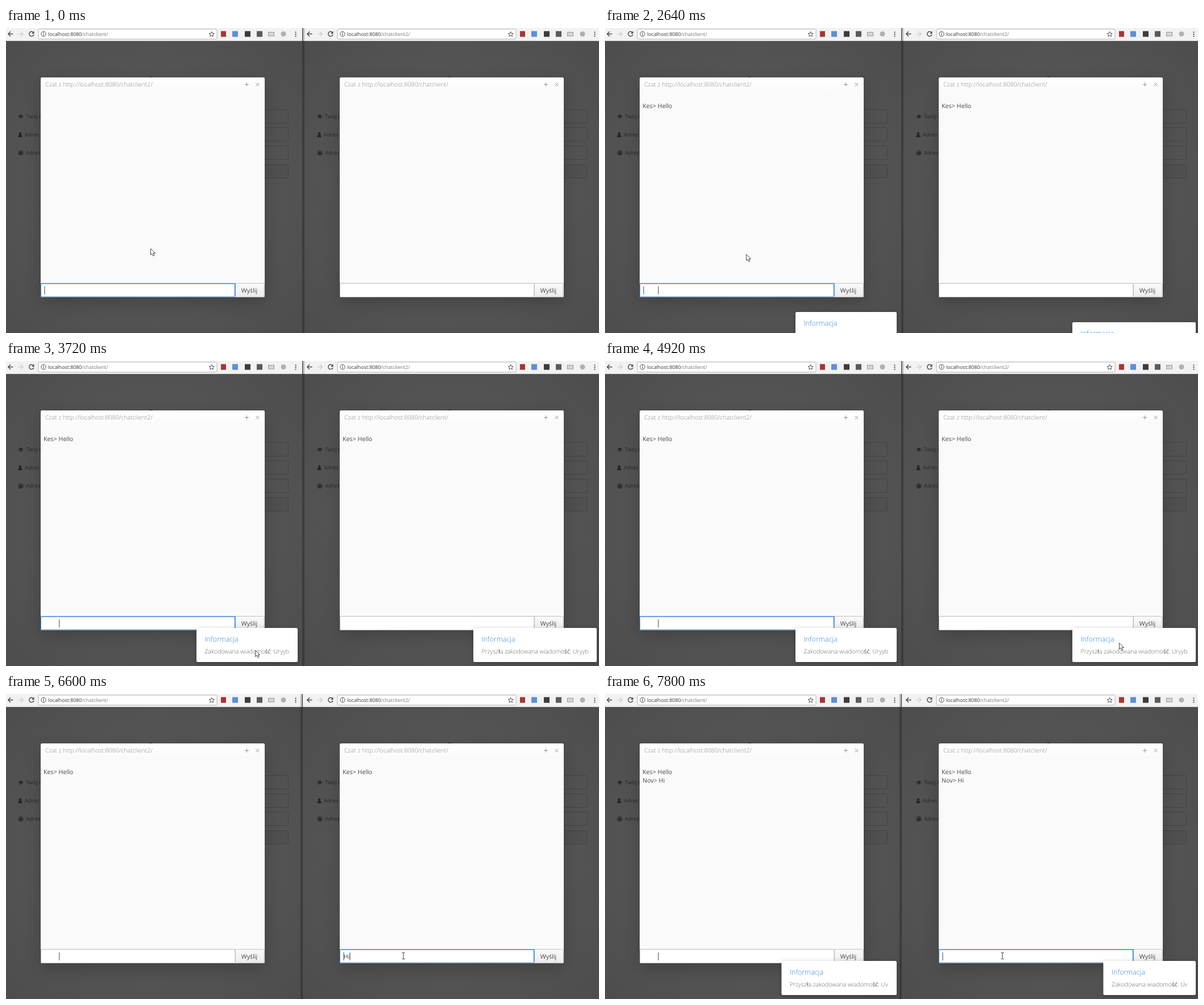
Animation, 1043 px wide and 537 px high, one loop 8000 ms. Source, as an HTML page:

```html
<!DOCTYPE html>
<html lang="pl">
<head>
<meta charset="utf-8">
<title>Czat</title>
<style>
html, body { margin: 0; width: 100%; height: 100%; overflow: hidden; background: #505050; }
#stage { display: block; width: 1043px; height: 537px; }
text { font-family: "Open Sans", "Noto Sans", sans-serif; font-size: 10.7px; fill: #474747; white-space: pre; text-rendering: geometricPrecision; }
.url { font-size: 8.8px; fill: #333; }
.url tspan { fill: #777; }
.label { font-size: 9.5px; fill: #292929; }
.title { font-size: 10.6px; font-weight: 300; fill: #8a8a8a; }
.caption { font-size: 12.4px; font-weight: 300; fill: #2f86d6; }
.body { font-size: 10.5px; font-weight: 300; fill: #666; }
.body tspan { font-weight: 400; fill: #505050; }
.line { fill: none; stroke: #4a4a4a; stroke-width: 1.4; }
.field { fill: none; stroke: #434343; }
.caret { fill: #444; }
</style>
</head>
<body>
<svg id="stage" viewBox="0 0 1043 537">
  <defs>
    <radialGradient id="curtain" gradientUnits="userSpaceOnUse" cx="258" cy="280" r="365">
      <stop stop-color="#5d5d5d"/><stop offset="1" stop-color="#4d4d4d"/>
    </radialGradient>
    <linearGradient id="button" x2="0" y2="1">
      <stop stop-color="#fafafa"/><stop offset="1" stop-color="#ededed"/>
    </linearGradient>
    <linearGradient id="head" x2="0" y2="1">
      <stop stop-color="#fff"/><stop offset="1" stop-color="#fafafa"/>
    </linearGradient>
    <linearGradient id="edge">
      <stop stop-color="#000" stop-opacity=".4"/><stop offset="1" stop-color="#000" stop-opacity="0"/>
    </linearGradient>
    <filter id="shadow" x="-20%" y="-20%" width="140%" height="150%">
      <feDropShadow dx="0" dy="9" stdDeviation="16" flood-opacity=".22"/>
    </filter>
    <filter id="soft" x="-10%" y="-25%" width="120%" height="160%">
      <feDropShadow dx="0" dy="2" stdDeviation="4" flood-opacity=".25"/>
    </filter>

    <g id="toolbar">
      <rect x="-4" width="530" height="23" fill="#f2f2f2"/>
      <rect x="-4" y="22" width="530" height="1" fill="#d2d2d2"/>
      <path class="line" d="M12.500 10.500H4M8 6.300 3.800 10.500 8 14.700"/>
      <path class="line" style="stroke:#d0d0d0" d="M21.500 10.500H30M26 6.300 30.200 10.500 26 14.700"/>
      <path class="line" d="M48 7.500A4.200 4.200 0 1 0 49 11.500"/>
      <path d="M49.500 5.500v4.500H45z" fill="#4a4a4a"/>
      <rect x="57" y="2" width="314" height="17.500" rx="1.500" fill="#fff" stroke="#b4b4b4"/>
      <circle class="line" style="stroke-width:1" cx="66" cy="10.500" r="4.100"/>
      <path class="line" style="stroke-width:1.200" d="M66 9.800v3M66 7.800v1.100"/>
      <path class="line" style="stroke-width:1" d="M361.700 6.300l1.300 3 3.200.3-2.400 2.100.7 3.200-2.800-1.700-2.800 1.700.7-3.200-2.400-2.100 3.200-.3z"/>
      <rect x="378" y="5.500" width="9" height="10" fill="#a83434"/>
      <rect x="398" y="5.500" width="10" height="10" fill="#5c8fd6"/>
      <rect x="420" y="5.500" width="10" height="10" fill="#3c3c3c"/>
      <rect x="441" y="5.500" width="10" height="10" fill="#5a5a5a"/>
      <rect x="461.500" y="7.500" width="10" height="6.500" fill="#e8e8e8" stroke="#909090"/>
      <path d="M463 9.500h7M463 11.800h7" stroke="#909090" stroke-dasharray="1 1"/>
      <circle cx="488" cy="10.500" r="4.500" fill="#b0b0b0"/>
      <path d="M509.500 6.500v9" stroke="#4a4a4a" stroke-width="1.900" stroke-dasharray="1.900 1.600"/>
    </g>

    <g id="form">
      <rect x="252" y="86" width="5" height="2" fill="#222"/>
      <path d="M21.500 156q4.500-6 9 0-4.500 5.500-9 0z" fill="none" stroke="#252525"/>
      <circle cx="26" cy="155.500" r="2.300" fill="#252525"/>
      <circle cx="25" cy="185.800" r="2.300" fill="#252525"/>
      <path d="M21.300 192.300q0-5 3.700-4.500 3.700-.5 3.700 4.500z" fill="#252525"/>
      <circle cx="26" cy="220" r="4" fill="none" stroke="#252525" stroke-width="1.200"/>
      <path d="M23.500 219.500h5v3h-5zM24.500 219.500v-2h3v2" fill="#252525"/>
      <text class="label" x="35" y="159">Twój nick</text>
      <text class="label" x="33" y="191">Adres czatu</text>
      <text class="label" x="35" y="223">Adres czatu</text>
      <rect class="field" x="300.500" y="143.500" width="196" height="24" rx="2"/>
      <rect class="field" x="300.500" y="175.500" width="196" height="24" rx="2"/>
      <rect class="field" x="300.500" y="207.500" width="196" height="24" rx="2"/>
      <rect class="field" x="300.500" y="240.500" width="196" height="23.500" rx="2" style="fill:#505050"/>
    </g>

    <g id="window">
      <rect x="61" y="87" width="394" height="387" rx="2.500" fill="#fff" filter="url(#shadow)"/>
      <rect x="62" y="88" width="392" height="24" fill="url(#head)"/>
      <rect x="62" y="111" width="392" height="338" fill="#fafafa"/>
      <path d="M420 99.500h7M423.500 96v7M439.500 96.500l6 6M445.500 96.500l-6 6" stroke="#8c8c8c" stroke-width=".9"/>
      <rect x="403.500" y="449.500" width="50.500" height="23.500" rx="1.500" fill="url(#button)" stroke="#c2c2c2"/>
      <text x="428" y="466" text-anchor="middle">Wyślij</text>
      <path d="M61.500 473V449.500H403V473" fill="none" stroke="#b8b8b8"/>
      <path d="M62 473.300H403" stroke="#d4d4d4"/>
    </g>
    <g id="ring" fill="none" stroke="#5296dc">
      <rect x="61.500" y="449.500" width="341.500" height="23.500" rx="1.500"/>
      <path d="M62 449.800H402.700V473" stroke-width="1.800"/>
    </g>
  </defs>

  <svg id="left" width="522" height="537"></svg>
  <svg id="right" x="522" width="521" height="537"></svg>
  <rect id="edgeR" x="521.500" y="0" width="5" height="537" fill="url(#edge)"/>
  <rect id="edgeL" x="-521.500" y="0" width="5" height="537" fill="url(#edge)" transform="scale(-1 1)"/>
  <path d="M521.500 0V537" stroke="#3c3c3c"/>
  <path id="arrow" d="M.5.500V11.500L3.100 9.200 5 13.400 6.900 12.500 5.100 8.500H8.500z" fill="#fff" stroke="#333" stroke-width=".9"/>
  <path id="beam" d="M-2.500-5.500H-.7L0-5 .7-5.500H2.500M0-5V5M-2.500 5.500H-.7L0 5 .7 5.500H2.500" fill="none" stroke="#333"/>
</svg>
<script>
const LOOP = 8000;
const $ = id => document.getElementById(id);
const show = (el, on) => { el.style.display = on ? '' : 'none'; };

// Value of the last [time, ...values] row reached at t.
const at = (rows, t) => rows.reduce((cur, row) => t >= row[0] ? row : cur).slice(1);

const accent = s => s.replace(/ść|ł/g, '<tspan>$&</tspan>');

function toast(name, x, text) {
  return `<g id="${name}"><rect x="${x}" width="${513 - x}" height="60" rx="2.500" fill="#fff" filter="url(#soft)"/>
    <text class="caption" x="${x + 14.5}" y="24">Informacja</text>
    <text class="body" x="${x + 14.5}" y="45">${accent(text)}</text></g>`;
}

function pane(id, shift, path, peer, toasts) {
  $(id).innerHTML = `<g transform="translate(${shift})">
    <rect x="-4" width="530" height="537" fill="url(#curtain)"/>
    <use href="#form"/><use href="#toolbar"/>
    <text class="url" x="74" y="13.800">localhost:8080<tspan>/${path}/</tspan></text>
    <use href="#window"/>
    <text class="title" x="69" y="103">Czat z http://localhost:8080/${peer}/</text>
    <text id="${id}First" x="66" y="141">Kes&gt; Hello</text>
    <text id="${id}Second" x="66" y="155.700">Nov&gt; Hi</text>
    <use id="${id}Ring" href="#ring"/>
    <text id="${id}Input" x="67.700" y="466"></text>
    <rect id="${id}Start" class="caret" x="67.500" y="455" width="1" height="14"/>
    <rect id="${id}End" class="caret" y="455" width="1" height="14"/>
    ${toasts}</g>`;
}

pane('left', 0, 'chatclient', 'chatclient2',
  toast('sentHello', 335, 'Zakodowana wiadomość: Uryyb') +
  toast('gotHi', 310.5, 'Przyszła zakodowana wiadomość: Uv'));
pane('right', 4, 'chatclient2', 'chatclient',
  toast('gotHello', 296, 'Przyszła zakodowana wiadomość: Uryyb') +
  toast('sentHi', 350.5, 'Zakodowana wiadomość: Uv'));

const SENT = 2640, REPLIED = 7560, FOCUS = 6000, BEAM = 5640;

// Time, x, y
const pointer = [
  [0, 254, 388], [600, 251, 394], [720, 248, 398],
  [3360, 262, 412], [3480, 318, 450], [3600, 390, 488], [3720, 438, 509], [3840, 453, 514],
  [4560, 480, 515], [4680, 610, 511], [4800, 790, 503], [4920, 904, 496], [5040, 907, 498], [5160, 909, 498],
  [5400, 890, 492], [5520, 800, 472], [BEAM, 712, 461], [5760, 699, 461]
];
// Time, text, end caret x
const typedLeft = [[0, '', 0], [1080, 'H', 75], [1320, 'He', 82], [1440, 'Hell', 87], [1560, 'Hello', 93.3], [SENT, '', 93.3]];
const typedRight = [[0, '', 0], [6480, 'H', 75], [6600, 'Hi', 78.5], [REPLIED, '', 0]];
const blinkLeft = [[0, true], [3600, false], [5160, true], [5520, false]];

function slide(name, t, start, rise, end) {
  const el = $(name);
  show(el, t >= start && t < end);
  const y = at([[0, rise[0]], [start + 120, rise[1]], [start + 240, 470]], t)[0];
  el.setAttribute('transform', `translate(0 ${y})`);
  el.setAttribute('opacity', t >= 5040 && t < 5160 ? .5 : 1);
}

function input(id, rows, t, startOn) {
  const [text, x] = at(rows, t);
  $(id + 'Input').textContent = text;
  show($(id + 'Start'), startOn);
  show($(id + 'End'), x > 0);
  $(id + 'End').setAttribute('x', x);
}

function draw(t) {
  for (const id of ['left', 'right']) {
    show($(id + 'First'), t >= SENT);
    show($(id + 'Second'), t >= REPLIED);
    show($(id + 'Ring'), (t >= FOCUS) === (id === 'right'));
  }
  show($('edgeR'), t < FOCUS);
  show($('edgeL'), t >= FOCUS);

  input('left', typedLeft, t, at(blinkLeft, t)[0]);
  input('right', typedRight, t, t >= 6120);

  slide('sentHello', t, SENT, [500, 472], 5160);
  slide('gotHello', t, SENT, [518, 474], 5160);
  slide('sentHi', t, REPLIED, [500, 472], LOOP);
  slide('gotHi', t, REPLIED, [518, 474], LOOP);

  const [x, y] = at(pointer, t);
  for (const id of ['arrow', 'beam']) {
    show($(id), (t >= BEAM) === (id === 'beam'));
    $(id).setAttribute('transform', `translate(${x} ${y})`);
  }
}

const begin = performance.now();
function tick() {
  draw((performance.now() - begin) % LOOP);
  requestAnimationFrame(tick);
}
tick();
</script>
</body>
</html>
```
